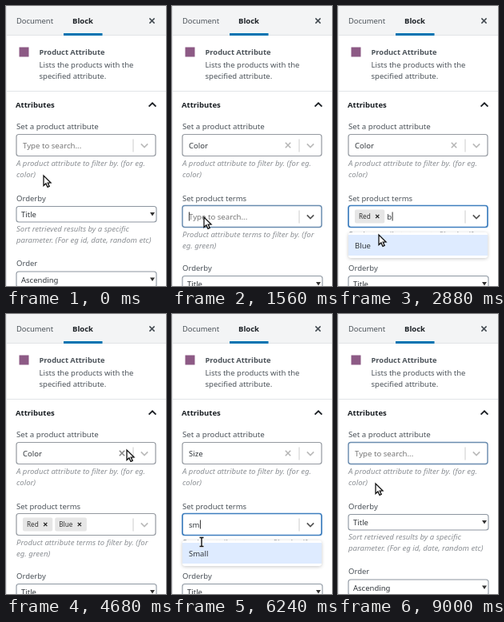
These frames come from a looping animation (200 px wide and 350 px high, 9030 ms). An HTML page with a canvas:

```html
<!DOCTYPE html>
<html lang="en">
<head>
<meta charset="utf-8">
<title>Block settings</title>
<style>
html, body { margin: 0; width: 100%; height: 100%; overflow: hidden; background: #fff; }
canvas { display: block; width: 200px; height: 350px; }
</style>
</head>
<body>
<canvas id="stage"></canvas>
<script>
const W = 200, H = 350, LOOP = 9030;
const BLINK = 520, FADE = 100, TRAVEL = 300, KEY_GAP = 150;
const FONT = '"Noto Sans", "Open Sans", sans-serif';
const INK = '#32373c', GREY = '#4b5259', HINT = '#8b8f94', LINE = '#e2e4e7';
const canvas = document.getElementById('stage');
const ctx = canvas.getContext('2d');
const scale = window.devicePixelRatio || 1;
canvas.width = W * scale;
canvas.height = H * scale;

// Places the pointer visits
const REST = { x: 47, y: 212 };
const ATTR = { x: 64, y: 178 };
const ATTR_OPTION = { x: 44, y: 208 };
const TERMS = { x: 40, y: 264 };
const TERM_OPTION = { x: 51, y: 286 };
const CLEAR = { x: 151, y: 170 };

// The session is recorded once: form changes and pointer arrivals.
const steps = [], moves = [{ t: 0, ...REST }];
let picked = [];

const set = (t, patch) => steps.push({ t, patch });
const hover = (t, spot) => moves.push({ t, ...spot });

function click(t, spot, patch) {
  hover(t, spot);
  set(t, { text: '', menu: '', ...patch });
}

function type(t, word, count = 1) {
  for (let i = 1; i <= count; i++) {
    set(t + (i - 1) * KEY_GAP, { text: word.slice(0, i).toLowerCase(), menu: word });
  }
}

function pickAttr(t, attr) {
  click(t, ATTR_OPTION, { attr, focus: '' });
}

function pickTerm(t, term, spot = TERM_OPTION) {
  picked = [...picked, term];
  click(t, spot, { terms: picked });
}

function clear(t) {
  picked = [];
  click(t, CLEAR, { attr: '', terms: picked, focus: 'attr' });
}

set(0, { focus: '', attr: '', terms: [], text: '', menu: '' });
click(390, ATTR, { focus: 'attr' });
type(700, 'Color');
hover(930, ATTR_OPTION);
pickAttr(1170, 'Color');
click(1510, TERMS, { focus: 'terms' });
type(1920, 'Red');
pickTerm(2280, 'Red');
type(2480, 'Blue');
pickTerm(3300, 'Blue');
hover(3500, { x: 28, y: 316 });
hover(4110, { x: 116, y: 208 });
set(4400, { focus: '' });
hover(4640, CLEAR);
clear(4770);
type(5040, 'Size');
pickAttr(5400, 'Size');
click(5660, TERMS, { focus: 'terms' });
type(5910, 'Small', 2);
hover(6200, { x: 37, y: 285 });
pickTerm(6390, 'Small', { x: 37, y: 285 });
type(6850, 'Medium');
pickTerm(7610, 'Medium', { x: 57, y: 298 });
hover(7940, CLEAR);
clear(8340);
hover(8900, REST);
set(8950, { focus: '' });

function stateAt(now) {
  const s = { since: 0, focusAt: -FADE, last: '' };
  for (const { t, patch } of steps) {
    if (t > now) break;
    if (t && 'focus' in patch) {
      s.last = s.focus;
      s.focusAt = t;
    }
    Object.assign(s, patch, { since: t });
  }
  s.caret = Math.floor((now - s.since) / BLINK) % 2 === 0;
  const k = Math.min(1, (now - s.focusAt) / FADE);
  s.glow = name => (s.focus === name ? k : 0) + (s.last === name ? 1 - k : 0);
  return s;
}

function pointerAt(now) {
  const i = moves.findIndex(m => m.t > now);
  if (i < 0) return moves[moves.length - 1];
  const a = moves[i - 1], b = moves[i];
  const from = Math.max(a.t, b.t - TRAVEL);
  const p = Math.max(0, (now - from) / (b.t - from));
  const e = p * p * (3 - 2 * p);
  return { x: a.x + (b.x - a.x) * e, y: a.y + (b.y - a.y) * e };
}

function text(str, x, y, color = INK, size = 9.5, style = '') {
  ctx.font = `${style} ${size}px ${FONT}`;
  ctx.fillStyle = color;
  ctx.fillText(str, x, y);
  return ctx.measureText(str).width;
}

function hint(y, ...rows) {
  rows.forEach((row, i) => text(row, 13, y + i * 14, HINT, 9.55, 'italic'));
}

function rect(x, y, w, h, color) {
  ctx.fillStyle = color;
  ctx.fillRect(x, y, w, h);
}

function box(x, y, w, h, r, fill, stroke, width = 1) {
  ctx.beginPath();
  ctx.roundRect(x, y, w, h, r);
  ctx.fillStyle = fill;
  ctx.fill();
  if (!stroke) return;
  ctx.strokeStyle = stroke;
  ctx.lineWidth = width;
  ctx.stroke();
}

function lines(color, width, ...paths) {
  ctx.beginPath();
  for (const pts of paths) pts.forEach(([x, y], i) => i ? ctx.lineTo(x, y) : ctx.moveTo(x, y));
  ctx.strokeStyle = color;
  ctx.lineWidth = width;
  ctx.stroke();
}

function cross(x, y, r, color, width) {
  lines(color, width, [[x - r, y - r], [x + r, y + r]], [[x + r, y - r], [x - r, y + r]]);
}

function chevron(x, y, r, dir, color, width) {
  lines(color, width, [[x - r, y - dir * r / 2], [x, y + dir * r / 2], [x + r, y - dir * r / 2]]);
}

function mix(a, b, k) {
  return `rgb(${a.map((v, i) => Math.round(v + (b[i] - v) * k)).join()})`;
}

function chip(label, x, y) {
  ctx.font = `8.2px ${FONT}`;
  const w = ctx.measureText(label).width + 22.5;
  box(x, y, w, 17, 2, '#e6e6e6');
  text(label, x + 5, y + 11.5, '#333', 8.2);
  cross(x + w - 9, y + 8.5, 2.1, '#222', 1.3);
  return x + w + 3;
}

function searchBox(s, name, y, mouse) {
  const active = s.focus === name, glow = s.glow(name);
  box(13, y, 174, 27, 3, '#fff', mix([148, 153, 160], [62, 126, 190], glow), 1.2 + glow * 0.5);
  rect(158.5, y + 6, 1, 16, '#ccc');
  chevron(173, y + 14, 4.2, 1, active ? '#555' : '#bbb', 1.7);

  let x = 21;
  const typed = active ? s.text : '';
  const value = name === 'attr' ? s.attr : '';
  const chips = name === 'terms' ? s.terms : [];
  for (const term of chips) x = chip(term, x, y + 5);
  if (value && !typed) {
    text(value, x, y + 17.3);
    const near = Math.hypot(mouse.x - 145, mouse.y - 174) < 9;
    cross(145, y + 13.5, 3.2, near ? '#858585' : '#b4b4b4', 1.5);
  }
  if (!value && !typed && !chips.length) text('Type to search...', x, y + 17.3, '#777', 9.65);
  if (typed) x += text(typed, x, y + 17.3) + 0.5;
  if (active && s.caret) rect(x, y + 8, 1, 11, '#333');
}

function menu(label, y) {
  ctx.save();
  ctx.shadowColor = 'rgba(0,0,0,.22)';
  ctx.shadowBlur = 4 * scale;
  ctx.shadowOffsetY = scale;
  box(13, y, 174, 32, 3, '#fff');
  ctx.restore();
  rect(13, y + 3, 174, 26, '#deebff');
  text(label, 21, y + 20);
}

function nativeSelect(label, y) {
  box(13, y, 175, 19.5, 3, '#fff', '#8d96a0', 1.1);
  text(label, 19, y + 13.5);
  ctx.beginPath();
  ctx.moveTo(180, y + 7.5);
  ctx.lineTo(186, y + 7.5);
  ctx.lineTo(183, y + 12);
  ctx.fillStyle = '#333';
  ctx.fill();
}

function header() {
  rect(0, 0, W, 37, '#f3f4f5');
  text('Document', 13, 22, GREY, 9.4);
  text('Block', 83, 22, '#191e23', 9.5, '600');
  cross(182.5, 18.5, 3.1, '#444b52', 1.5);
  rect(0, 36, W, 1, LINE);
  rect(72, 34, 48.5, 3, '#0073b1');
  box(16.5, 51.5, 12, 12, 0, '#8d5a85');
  text('Product Attribute', 41.5, 60.5, GREY, 9.3, '600');
  text('Lists the products with the', 41.5, 77, GREY);
  text('specified attribute.', 41.5, 91, GREY);
  rect(0, 106, W, 1, LINE);
  text('Attributes', 12, 126.5, '#191e23', 9.5, '600');
  chevron(183, 123.5, 4.4, -1, '#191e23', 1.8);
  rect(0, 0, 1, H, LINE);
}

function form(s, mouse) {
  text('Set a product attribute', 13, 154, GREY, 9.7);
  searchBox(s, 'attr', 160.5, mouse);
  hint(199.5, 'A product attribute to filter by. (for eg.', 'color)');

  const shift = s.attr ? 87 : 0;
  if (s.attr) {
    text('Set product terms', 13, 243.5, GREY);
    searchBox(s, 'terms', 249.5, mouse);
    hint(288.5, 'Product attribute terms to filter by. (for', 'eg. green)');
  }
  text('Orderby', 13, 244 + shift, GREY);
  nativeSelect('Title', 250.5 + shift);
  hint(282 + shift, 'Sort retrieved results by a specific', 'parameter. (For eg id, date, random etc)');
  text('Order', 13, 324.5 + shift, GREY);
  nativeSelect('Ascending', 332 + shift);
  if (s.menu) menu(s.menu, s.focus === 'terms' ? 283 : 194);
}

function arrow({ x, y }) {
  const pts = [[0, 0], [0, 12.5], [2.9, 9.9], [5, 14.4], [7.2, 13.4], [5.2, 9.1], [9, 9]];
  ctx.beginPath();
  for (const [dx, dy] of pts) ctx.lineTo(x + dx, y + dy);
  ctx.closePath();
  ctx.fillStyle = '#fff';
  ctx.fill();
  ctx.strokeStyle = '#111';
  ctx.lineWidth = 1.3;
  ctx.stroke();
}

function beam({ x, y }) {
  const serif = dy => [[x - 2.5, y + dy], [x + 2.5, y + dy]];
  const shape = [[[x, y - 5], [x, y + 5]], serif(-5.5), serif(5.5)];
  lines('#fff', 3, ...shape);
  lines('#111', 1.4, ...shape);
}

function draw(now) {
  const s = stateAt(now), mouse = pointerAt(now);
  ctx.setTransform(scale, 0, 0, scale, 0, 0);
  rect(0, 0, W, H, '#fff');
  header();
  form(s, mouse);
  // The pointer turns into a text beam over the uncovered hint lines.
  const overHint = s.attr && mouse.y > 278 && mouse.y < (s.menu ? 286 : 306);
  (overHint ? beam : arrow)(mouse);
}

const start = performance.now();
function tick() {
  draw((performance.now() - start) % LOOP);
  requestAnimationFrame(tick);
}
tick();
</script>
</body>
</html>
```
